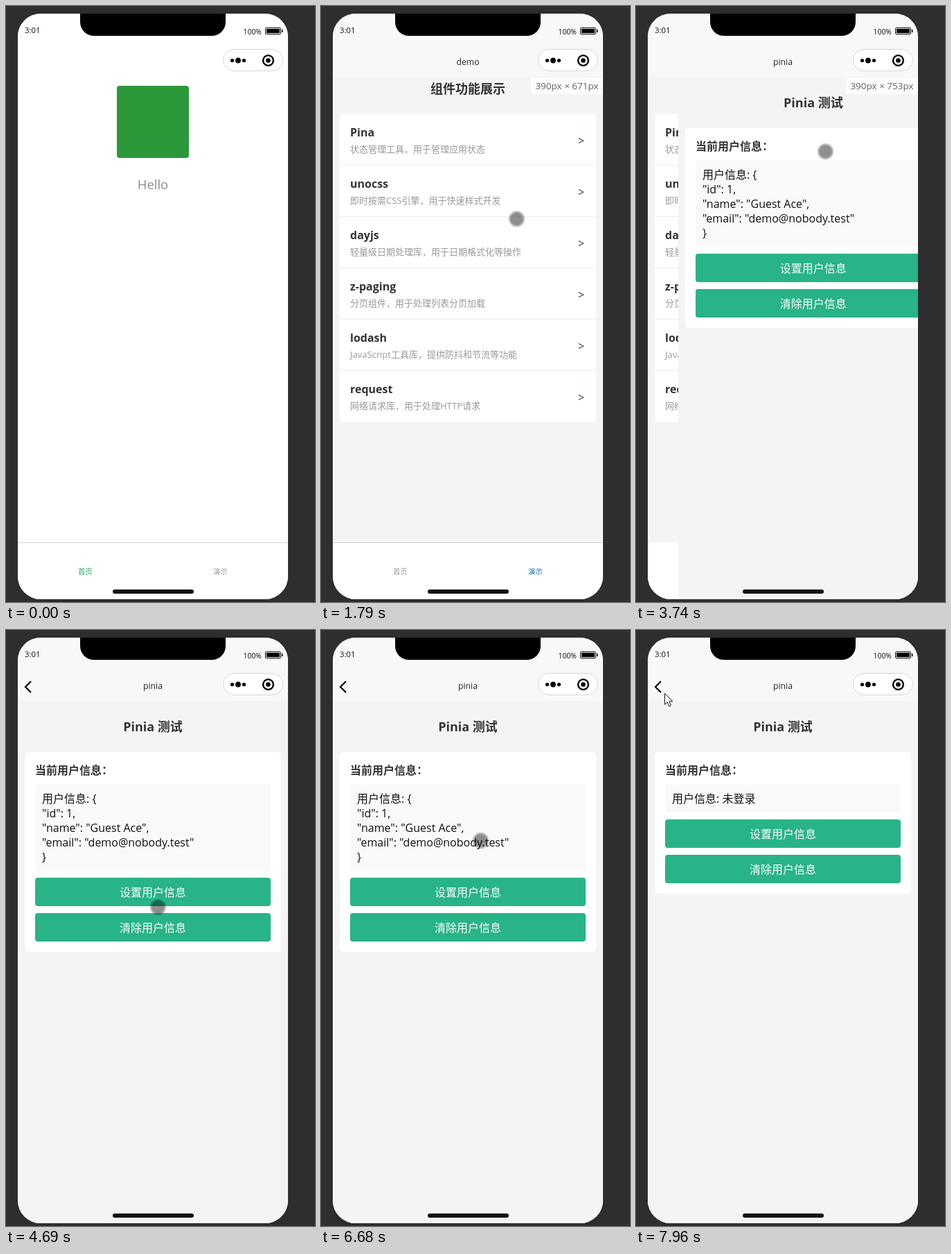
An HTML page that plays this animation: 446 by 859 pixels, repeating every 8000 ms.

```html
<!DOCTYPE html>
<html lang="zh-CN">
<head>
<meta charset="utf-8">
<title>Phone demo</title>
<style>
html, body { margin: 0; width: 100%; height: 100%; overflow: hidden; background: #2e2e2e; }
svg { display: block; font-family: "Open Sans", "Noto Sans CJK SC", "Noto Sans CJK", sans-serif; }
.mid { text-anchor: middle; }
.bold { font-weight: 700; fill: #333; }
.nav-title { font-size: 12.2px; fill: #222; }
.tab { font-size: 10.4px; fill: #999; }
.desc { font-size: 13px; fill: #999; }
.tip { font-size: 13.5px; fill: #666; }
.button rect { fill: #28b389; }
.button text { fill: #fff; font-size: 16px; }

/* Hard switches */
.cut { animation: 8s step-end infinite; }
.home { animation-name: home; }
.demo { animation-name: demo; }
.demo-title { animation-name: demo-title; }
.tabs { animation-name: tabs; }
.blank { animation-name: blank; }
.pinia-title { animation-name: pinia-title; }
.tip-short { animation-name: tip-short; }
.tip-tall { animation-name: tip-tall; }
.back { animation-name: back; }
.user { animation-name: user; }
.no-user { animation-name: no-user; }
.card { animation-name: card; }
.info { animation-name: info; }
.buttons { animation-name: buttons; }
.pointer { animation-name: pointer; }
.arrow { animation-name: arrow; }
@keyframes home { 0% { visibility: visible } 14.875%, 100% { visibility: hidden } }
@keyframes demo { 0% { visibility: hidden } 14.875%, 100% { visibility: visible } }
@keyframes demo-title { 0%, 35.875%, 100% { visibility: hidden } 14.875% { visibility: visible } }
@keyframes tabs { 0% { visibility: visible } 35.875%, 100% { visibility: hidden } }
@keyframes blank { 0% { visibility: hidden } 40.875%, 100% { visibility: visible } }
@keyframes pinia-title { 0% { visibility: hidden } 35.875%, 100% { visibility: visible } }
@keyframes tip-short { 0%, 29.125%, 100% { visibility: hidden } 16.5% { visibility: visible } }
@keyframes tip-tall { 0%, 48.5%, 100% { visibility: hidden } 35.875% { visibility: visible } }
@keyframes back { 0% { visibility: hidden } 48.5%, 100% { visibility: visible } }
@keyframes user { 0%, 81.75% { visibility: visible } 74.375%, 93.625%, 100% { visibility: hidden } }
@keyframes no-user { 0%, 81.75% { visibility: hidden } 74.375%, 93.625%, 100% { visibility: visible } }
@keyframes card { 0%, 81.75% { height: 288px } 74.375%, 93.625%, 100% { height: 204px } }
@keyframes info { 0%, 81.75% { height: 125px } 74.375%, 93.625%, 100% { height: 41px } }
@keyframes buttons { 0%, 81.75% { transform: none } 74.375%, 93.625%, 100% { transform: translateY(-84px) } }
@keyframes pointer { 0%, 99.25%, 100% { visibility: hidden } 6.5% { visibility: visible } }
@keyframes arrow { 0% { visibility: hidden } 99.25%, 100% { visibility: visible } }

/* Smooth motion */
.slide { animation: slide 8s ease infinite; }
@keyframes slide { 0%, 44.5% { transform: translateX(390px) } 48.25%, 100% { transform: none } }
.move { animation: move 8s linear infinite; }
@keyframes move {
  0%, 6.5% { transform: translate(348px, 827px) }
  7.375% { transform: translate(327px, 811px) }
  9.875% { transform: translate(325px, 812px) }
  10.75%, 20% { transform: translate(314px, 815px) }
  20.625% { transform: translate(311px, 760px) }
  21.5% { transform: translate(296px, 500px) }
  22.375% { transform: translate(282.5px, 307.5px) }
  23.25% { transform: translate(279px, 262px) }
  25% { transform: translate(276px, 232px) }
  29.125%, 35.875% { transform: translate(273px, 214px) }
  37.5%, 46.75% { transform: translate(273.5px, 209.5px) }
  48.5%, 52.875% { transform: translate(273.5px, 220.5px) }
  53.5% { transform: translate(271px, 235px) }
  55.25% { transform: translate(250px, 315px) }
  57% { transform: translate(228px, 378px) }
  58.625%, 60.625% { transform: translate(219.5px, 399.5px) }
  66%, 67.875% { transform: translate(221px, 377px) }
  68.5% { transform: translate(220px, 384px) }
  72% { transform: translate(212px, 432px) }
  74.375%, 76.125% { transform: translate(211.5px, 436.5px) }
  80% { transform: translate(226px, 318px) }
  82.625%, 84.375% { transform: translate(230.5px, 303.5px) }
  86.875% { transform: translate(226px, 335px) }
  90.875% { transform: translate(211px, 418px) }
  92.75%, 95.5% { transform: translate(209.5px, 425.5px) }
  96.125% { transform: translate(204px, 400px) }
  97% { transform: translate(172px, 300px) }
  97.875% { transform: translate(115px, 190px) }
  98.75%, 100% { transform: translate(62px, 118px) }
}
</style>
</head>
<body>
<svg width="446" height="859" viewBox="0 0 446 859">
  <defs>
    <clipPath id="screen"><rect x="17" y="11" width="390" height="844" rx="33"/></clipPath>
    <clipPath id="page"><rect x="17" y="102" width="390" height="753"/></clipPath>
  </defs>
  <rect width="446" height="859" fill="#2e2e2e"/>

  <g clip-path="url(#screen)">
    <rect x="17" y="11" width="390" height="844" fill="#f4f4f3"/>

    <g class="cut demo">
      <rect x="17" y="11" width="390" height="91" fill="#f8f8f8"/>
      <text class="mid bold" x="212" y="126" font-size="18">组件功能展示</text>
      <rect x="27" y="156" width="370" height="443.5" rx="4" fill="#fff"/>
      <g id="rows"></g>
    </g>

    <g class="cut home">
      <rect x="17" y="11" width="390" height="762" fill="#fff"/>
      <rect x="160" y="115" width="104" height="104" rx="4" fill="#2b9939"/>
      <text class="mid" x="212" y="264" font-size="18.4" fill="#86928a">Hello</text>
    </g>

    <g class="cut tabs">
      <rect x="17" y="773" width="390" height="82" fill="#fff"/>
      <path d="M17 773.5H407" stroke="#d2d2d2"/>
    </g>
    <g class="cut home">
      <text class="mid tab" x="114.5" y="819" style="fill:#2f9d68">首页</text>
      <text class="mid tab" x="309.5" y="819">演示</text>
    </g>
    <g class="cut demo-title">
      <text class="mid tab" x="114.5" y="819">首页</text>
      <text class="mid tab" x="309.5" y="819" style="fill:#19708f">演示</text>
      <text class="mid nav-title" x="212" y="85">demo</text>
    </g>
    <rect class="cut blank" x="17" y="773" width="390" height="82" fill="#fff"/>
    <text class="cut pinia-title mid nav-title" x="212" y="85">pinia</text>

    <g clip-path="url(#page)">
      <g class="slide">
        <rect x="17" y="102" width="390" height="753" fill="#f4f4f4"/>
        <text class="mid bold" x="212" y="146" font-size="18">Pinia 测试</text>
        <rect class="cut card" x="27" y="176" width="370" height="288" rx="5" fill="#fff"/>
        <text class="bold" x="42" y="208" font-size="16">当前用户信息：</text>
        <rect class="cut info" x="42" y="222" width="340" height="125" rx="4" fill="#f9f9f9"/>
        <g font-size="16" fill="#111">
          <g class="cut user">
            <text x="52" y="249">用户信息: {</text>
            <text x="52" y="270">"id": 1,</text>
            <text x="52" y="291">"name": "Guest Ace",</text>
            <text x="52" y="312">"email": "demo@nobody.test"</text>
            <text x="52" y="333">}</text>
          </g>
          <text class="cut no-user" x="52" y="249">用户信息: 未登录</text>
        </g>
        <g class="cut buttons">
          <g class="button">
            <rect x="42" y="357" width="340" height="41" rx="4"/>
            <text class="mid" x="212" y="384">设置用户信息</text>
          </g>
          <g class="button">
            <rect x="42" y="408" width="340" height="41" rx="4"/>
            <text class="mid" x="212" y="435">清除用户信息</text>
          </g>
        </g>
      </g>
    </g>

    <g class="cut tip-short">
      <rect x="303" y="103" width="104" height="24" fill="#fcfcfc"/>
      <text class="tip mid" x="355" y="120">390px × 671px</text>
    </g>
    <g class="cut tip-tall">
      <rect x="303" y="103" width="104" height="24" fill="#fcfcfc"/>
      <text class="tip mid" x="355" y="120">390px × 753px</text>
    </g>

    <!-- Status bar, capsule and home indicator -->
    <path d="M107 11H317V23a20 20 0 0 1-20 20H127a20 20 0 0 1-20-20z"/>
    <text x="27" y="39" font-size="11.4" fill="#111">3:01</text>
    <text x="342.5" y="41" font-size="10.4" fill="#111">100%</text>
    <rect x="374.5" y="31.5" width="22" height="9" rx="1.5" fill="none" stroke="#000"/>
    <path d="M376 33h19v6h-19zM398 34h1.5v4h-1.5z"/>
    <rect x="313.5" y="62.5" width="86" height="31" rx="15.5" fill="#fff" stroke="#d6d6d6"/>
    <circle cx="326.5" cy="78.5" r="2.6"/>
    <circle cx="335" cy="78.5" r="3.9"/>
    <circle cx="343.5" cy="78.5" r="2.6"/>
    <circle cx="378.5" cy="78.5" r="7.4" fill="none" stroke="#000" stroke-width="2.4"/>
    <circle cx="378.5" cy="78.5" r="3.3"/>
    <path class="cut back" d="M36 74l-8 8 8 8" fill="none" stroke="#000" stroke-width="2.2"/>
    <rect x="154" y="841" width="117" height="6" rx="3" fill="#111"/>

    <g class="cut pointer">
      <g class="move">
        <circle r="11.5" fill-opacity=".27"/>
        <circle r="9.3" fill-opacity=".23"/>
      </g>
    </g>
    <path class="cut arrow" d="M41.5 91.5v16l3.7-3.6 2.6 6 2.6-1.2-2.5-5.7h5.1z" fill="#fff" stroke="#111"/>
  </g>
</svg>
<script>
const libraries = [
  ["Pina", "状态管理工具，用于管理应用状态"],
  ["unocss", "即时按需CSS引擎，用于快速样式开发"],
  ["dayjs", "轻量级日期处理库，用于日期格式化等操作"],
  ["z-paging", "分页组件，用于处理列表分页加载"],
  ["lodash", "JavaScript工具库，提供防抖和节流等功能"],
  ["request", "网络请求库，用于处理HTTP请求"]
];
document.getElementById("rows").innerHTML = libraries.map(([name, desc], i) => `
  <g transform="translate(0 ${156 + 74 * i})">
    ${i ? '<path d="M27 -.5H397" stroke="#eee"/>' : ""}
    <text class="bold" x="42" y="32" font-size="16">${name}</text>
    <text class="desc" x="42" y="55">${desc}</text>
    <text class="mid" x="375.5" y="44" font-size="16" fill="#1f3a52">&gt;</text>
  </g>`).join("");
</script>
</body>
</html>
```
